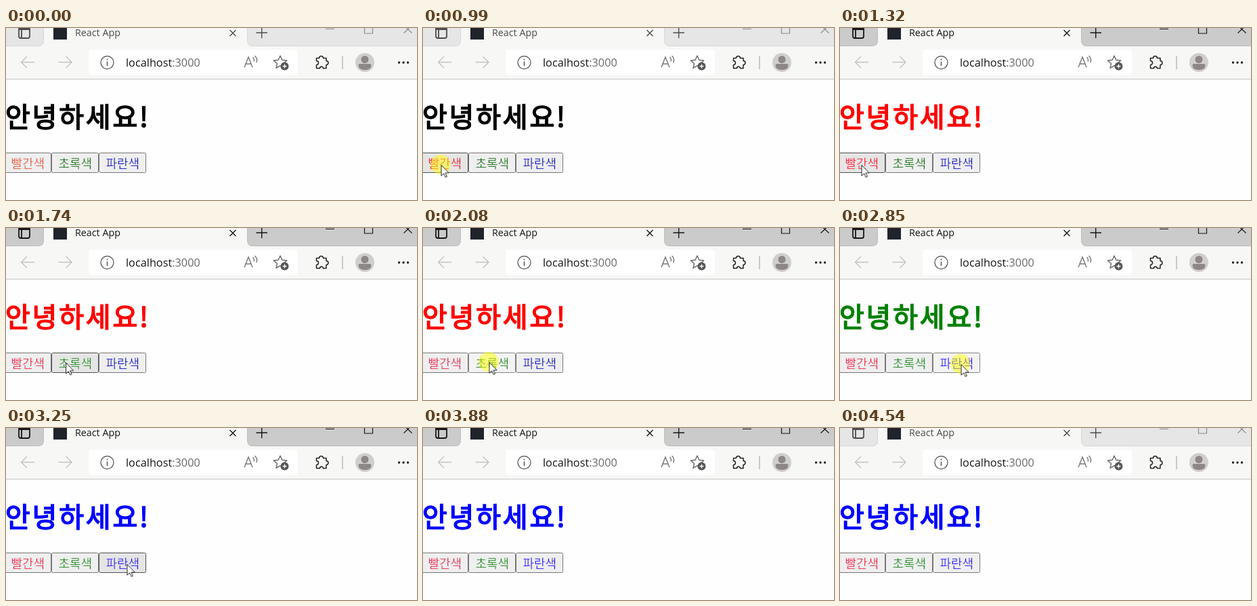
An HTML page that plays this animation: 607x254 px, repeating every 4610 ms.

```html
<!DOCTYPE html>
<html lang="ko">
<head>
<meta charset="utf-8">
<title>React App</title>
<style>
html, body { margin: 0; width: 100%; height: 100%; overflow: hidden; background: #fefefe; }
svg { display: block; }
.ui { font-family: "Open Sans", "Noto Sans", sans-serif; }
.ko { font-family: "Noto Sans CJK KR", "Noto Sans CJK", "Noto Sans KR", sans-serif; }
.line { fill: none; stroke: currentColor; }
.strip, .chrome, .greet, .btn, .btn text, .halo { animation: 4.61s step-end infinite; }

/* window focus */
.strip { animation-name: strip; }
.chrome { animation-name: chrome; }
.controls { animation-name: controls; }
@keyframes strip {
  0%, 98.48%, 100% { fill: #e6e6e6; stroke: #d6d6d6; }
  22.99% { fill: #cbcbcb; stroke: #bebebe; }
}
@keyframes chrome { 0%, 98.48%, 100% { color: #4c4c4c; } 22.99% { color: #161616; } }
@keyframes controls { 0%, 98.48%, 100% { color: #8c8c8c; } 22.99% { color: #161616; } }

/* regular weight thickened by its own outline: a semibold */
.greet {
  font-size: 40px; letter-spacing: 2.8px;
  fill: currentColor; stroke: currentColor; stroke-width: 1.6;
  animation-name: greet;
}
@keyframes greet {
  0% { color: #000; }
  25.59% { color: #f00; }
  46.63% { color: #008000; }
  66.37%, 100% { color: #00f; }
}

/* buttons: fill is the face, stroke the border; the label's outline thins it */
.btn { fill: #efefef; stroke: #767676; }
.btn text { font-size: 18px; font-weight: 300; stroke: #ececec; stroke-width: .4; }
.red { animation-name: redFace; }
.red text { animation-name: redText; }
.green { animation-name: greenFace; }
.green text { animation-name: greenText; }
.blue { animation-name: blueFace; }
.blue text { animation-name: blueText; }
@keyframes redFace {
  0%, 34.70%, 100% { fill: #efefef; stroke: #767676; }
  16.05% { fill: #e5e5e5; stroke: #4f4f4f; }
}
@keyframes greenFace {
  0%, 54.44%, 100% { fill: #efefef; stroke: #767676; }
  34.70%, 46.63% { fill: #e5e5e5; stroke: #4f4f4f; }
  42.29% { fill: #f3f3f3; stroke: #858585; }
}
@keyframes blueFace {
  0%, 72.01%, 100% { fill: #efefef; stroke: #767676; }
  54.44%, 66.37% { fill: #e5e5e5; stroke: #4f4f4f; }
  61.82% { fill: #f3f3f3; stroke: #858585; }
}
@keyframes redText { 0% { fill: #e8452c; } 16.05% { fill: #ff0018; } 34.70%, 100% { fill: #f0143c; } }
@keyframes greenText { 0% { fill: #066406; } 34.70%, 100% { fill: #0a800a; } }
@keyframes blueText { 0% { fill: #0000c4; } 54.44%, 100% { fill: #1606ff; } }

/* pointer */
.pointer { animation: move 4.61s step-end infinite; }
@keyframes move {
  0% { transform: translate(-40px, -40px); }
  11.27% { transform: translate(14px, 246px); animation-timing-function: steps(6); }
  20.17%, 27.11% { transform: translate(26.5px, 202px); }
  28.63% { transform: translate(31.5px, 202px); animation-timing-function: steps(7); }
  39.26% { transform: translate(97.5px, 198px); }
  48.37% { transform: translate(97.5px, 198px); animation-timing-function: steps(4); }
  54.44% { transform: translate(143.5px, 198px); animation-timing-function: steps(3); }
  59.00% { transform: translate(178.5px, 201px); }
  70.49% { transform: translate(178.5px, 201px); animation-timing-function: steps(3); }
  75.05% { transform: translate(270px, 203px); animation-timing-function: steps(4); }
  80.91% { transform: translate(494px, 210px); }
  82.42% { transform: translate(535px, 237px); }
  84.16%, 100% { transform: translate(-40px, -40px); }
}
.halo { animation-name: press; }
@keyframes press {
  0%, 25.59%, 46.63%, 66.37%, 100% { opacity: 0; }
  21.47%, 42.29%, 61.82% { opacity: .5; }
}
</style>
</head>
<body>
<svg width="607" height="254" viewBox="0 0 607 254">
  <!-- tab strip -->
  <rect width="607" height="75" fill="#f7f7f6"/>
  <path class="strip" d="M-1-1H55.500V18.500Q55.500 26.500 47.500 26.500H-1ZM356.500-1H608V26.500H364.500Q356.500 26.500 356.500 18.500Z"/>
  <g class="chrome">
    <g class="line" stroke-width="1.8">
      <rect x="19" y="-4" width="16" height="19" rx="3"/>
      <path d="M19 1.500H35" stroke-width="3"/>
      <path d="M23 1V14"/>
    </g>
    <text class="ui" x="102" y="12" font-size="14.3" fill="currentColor">React App</text>
    <path class="line" stroke-width="1.4" d="M330.500 3l9 9m0-9l-9 9M369.500 7h16.500M377.700-1v16"/>
  </g>
  <rect x="70" y="-3" width="20" height="20" fill="#20232a"/>
  <path class="chrome controls line" stroke-width="1.2" d="M472 1.500h13M529.500-4h12v12h-12zM587.500-4l12 11.500m0-11.500l-12 11.500"/>

  <!-- toolbar -->
  <path d="M0 75.500H607" stroke="#c6c6c6"/>
  <rect x="122" y="32" width="309" height="38" rx="5" fill="#fff"/>
  <g fill="none" stroke="#c4c4c4" stroke-width="1.4">
    <path d="M42 50.500H22.500m8.500-8.500l-8.500 8.500 8.500 8.500"/>
    <path d="M77.500 50.500H97m-8.500-8.500l8.500 8.500-8.500 8.500"/>
  </g>
  <g fill="none" stroke="#666" stroke-width="1.4">
    <circle cx="149.500" cy="51" r="9.500"/>
    <path d="M149.500 49.500v6.500M149.500 45.500v2" stroke-width="1.7"/>
    <path d="M352 58l6-15 6 15M354.200 53h7.600M364.500 43q3 3 1.500 6.500M367.500 41q4.500 4.500 2.500 10" stroke="#777"/>
    <path d="M405 41l2.800 6.300 6.900.700-5.200 4.500 1.500 6.700-6-3.500-6 3.500 1.500-6.700-5.200-4.500 6.900-.700z" stroke-linejoin="round"/>
  </g>
  <circle cx="411.500" cy="56.500" r="6" fill="#555"/>
  <path d="M408.500 56.500h6m-3-3v6" stroke="#fff" stroke-width="1.3"/>
  <text class="ui" x="177" y="57" font-size="16.3" fill="#161616">localhost<tspan fill="#6b6b6b">:3000</tspan></text>
  <path d="M458.500 44.500h4a3 3 0 0 1 6 0h4.500v4a3 3 0 0 1 0 6v5h-4.500a2.500 2.500 0 0 0-5 0h-5v-5a3 3 0 0 0 0-6z" fill="none" stroke="#222" stroke-width="1.500" stroke-linejoin="round"/>
  <path d="M497 41V61" stroke="#b5b5b5" stroke-width="1.4"/>
  <circle cx="530" cy="51" r="14" fill="#d1cfcd"/>
  <g fill="#8b8886">
    <circle cx="530" cy="46.500" r="5.500"/>
    <path d="M520.500 55q0-2 2-2h15q2 0 2 2 0 7-9.500 7t-9.500-7z"/>
  </g>
  <g fill="#222">
    <circle cx="580.500" cy="51" r="1.7"/>
    <circle cx="587" cy="51" r="1.7"/>
    <circle cx="593.500" cy="51" r="1.7"/>
  </g>

  <!-- page -->
  <text class="ko greet" x="-1" y="146">안녕하세요!</text>
  <g class="ko">
    <g class="btn red"><rect x="-2.500" y="184.500" width="69" height="29" rx="2"/><text x="7.500" y="206.500">빨간색</text></g>
    <g class="btn green"><rect x="67.500" y="184.500" width="69" height="29" rx="2"/><text x="77.500" y="206.500">초록색</text></g>
    <g class="btn blue"><rect x="137.500" y="184.500" width="69" height="29" rx="2"/><text x="147.500" y="206.500">파란색</text></g>
  </g>

  <g class="pointer">
    <circle class="halo" cx="-.5" cy="-.5" r="14.500" fill="#ff0"/>
    <path d="M.5.5V16.300L4.200 12.900 6.600 18.400 8.900 17.400 6.600 12H11.600Z" fill="#fff" stroke="#111" stroke-width=".9"/>
  </g>
</svg>
</body>
</html>
```
